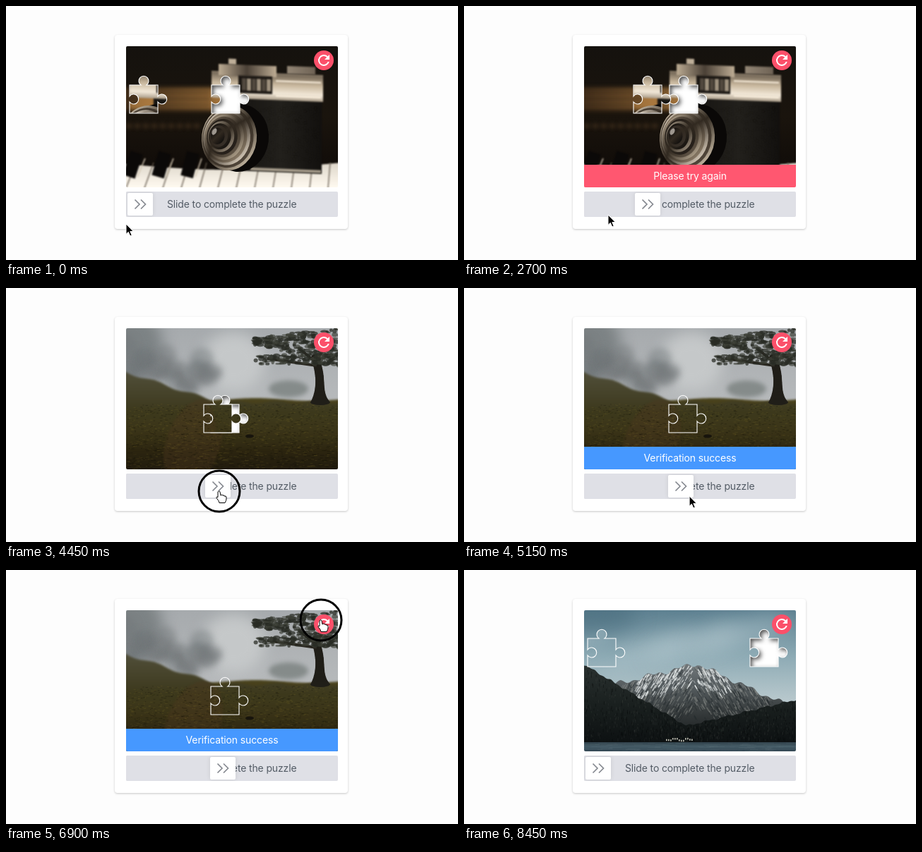
An HTML page with a canvas for the animation above (8500 ms loop, 640 by 360 pixels).

```html
<!DOCTYPE html>
<html lang="en">
<head>
<meta charset="utf-8">
<title>Slide puzzle</title>
<style>
html, body { margin: 0; width: 100%; height: 100%; overflow: hidden; background: #fdfdfd; }
#stage { position: absolute; left: 0; top: 0; width: 640px; height: 360px; overflow: hidden; font: 14px/32px Inter, "Liberation Sans", sans-serif; letter-spacing: -.14px; }
#stage > *, #track > * { position: absolute; box-sizing: border-box; }
#card { left: 154px; top: 41px; width: 330px; height: 275px; border-radius: 4px; background: #fff; box-shadow: 0 1px 3px rgba(0, 0, 0, .22); }
#photo { left: 170px; top: 57px; width: 300px; height: 200px; border-radius: 2px; overflow: hidden; }
#photo canvas { display: block; }
#bar { position: absolute; left: 0; top: 168px; width: 300px; height: 32px; color: #fff; text-align: center; }
#track { left: 170px; top: 263px; width: 300px; height: 36px; border-radius: 2px; background: #dfe0e6; overflow: hidden; }
#hint { left: 58px; top: 2px; color: #535b65; white-space: nowrap; }
#cover { left: 0; top: 0; height: 36px; background: #dfe0e6; }
#handle { left: 2px; top: 2px; width: 36px; height: 32px; border-radius: 2px; background: #fff; box-shadow: 0 0 6px rgba(0, 0, 0, .1); }
#over { left: 0; top: 0; }
</style>
</head>
<body>
<div id="stage">
  <div id="card"></div>
  <div id="photo"><canvas id="view" width="300" height="200"></canvas><div id="bar"></div></div>
  <div id="track">
    <div id="hint">Slide to complete the puzzle</div>
    <div id="cover"></div>
    <div id="handle"><svg width="36" height="32"><path d="M10.5 9.5l6.5 6.5-6.5 6.5M19 9.5l6.5 6.5-6.5 6.5" fill="none" stroke="#858990" stroke-width="1.7"/></svg></div>
  </div>
  <svg id="over" width="640" height="360">
    <circle cx="450" cy="77" r="14" fill="#fb506a"/>
    <path transform="translate(438 65)" fill="#fff" d="M17.65 6.35A8 8 0 1 0 19.73 14h-2.08A6 6 0 1 1 16.22 7.78L13 11h7V4z"/>
    <g id="cursor">
      <circle id="ring" r="29" fill="none" stroke="#000" stroke-width="3"/>
      <path id="arrow" d="M0 0V14.4L3.3 11.3 5.8 17 8.2 16 5.8 10.5H10.3Z" stroke="#fff"/>
      <path id="hand" d="M-2 1Q0-2 1 1L2 6Q4 4 5 6 7 5 7 7 10 6 10 9V11Q10 13 8 16.5H0Q0 14-4 9.6-4 7-2 8.5Z" fill="#fff" stroke="#000"/>
    </g>
  </svg>
</div>
<script>
const $ = id => document.getElementById(id);
const LOOP = 8500, W = 300, H = 200, LEFT = 170, TOP = 57;
const RETRY = 3000, SOLVED = 4850, NEXT = 7300;
const view = $('view').getContext('2d');
const piecePath = new Path2D('M0 0H16A7 7 0 1 1 24 0H40V16A7 7 0 1 1 40 24V40H0V24A7 7 0 1 0 0 16Z');

// Painting helpers, in stage coordinates
let c, seed;
const rnd = (a, b) => {
  seed = (seed * 16807) % 2147483647;
  return a + (b - a) * seed / 2147483647;
};
const repeat = (n, fn) => { for (let i = 0; i < n; i++) fn(i); };
const mix = (a, b, u) => a + (b - a) * u;
const soft = px => { c.filter = px ? `blur(${px}px)` : 'none'; };
const box = (fill, x, y, w, h) => { c.fillStyle = fill; c.fillRect(x, y, w, h); };
const oval = (fill, x, y, rx, ry = rx, turn = 0) => {
  c.fillStyle = fill;
  c.beginPath();
  c.ellipse(x, y, rx, ry, turn, 0, 7);
  c.fill();
};
const line = (stroke, width, x0, y0, x1, y1) => {
  c.strokeStyle = stroke;
  c.lineWidth = width;
  c.beginPath();
  c.moveTo(x0, y0);
  c.lineTo(x1, y1);
  c.stroke();
};
const ramp = (x0, y0, x1, y1, ...cols) => {
  const g = c.createLinearGradient(x0, y0, x1, y1);
  cols.forEach((col, i) => g.addColorStop(i / (cols.length - 1), col));
  return g;
};
const down = (...cols) => ramp(0, TOP, 0, TOP + H, ...cols);
const across = (...cols) => ramp(LEFT, 0, LEFT + W, 0, ...cols);
// Fills everything below the curve y = edge(x)
const below = (edge, fill) => {
  c.fillStyle = fill;
  c.beginPath();
  for (let x = 160; x <= 480; x += 2) c.lineTo(x, edge(x));
  c.lineTo(480, 265);
  c.lineTo(160, 265);
  c.fill();
};

function camera() {
  box(down('#15120e', '#1a140d', '#0d0907'), LEFT, TOP, W, H);
  soft(3);
  box(across('#49331d', '#aa793f', '#1a140d'), 160, 116, 170, 32);
  repeat(4, i => box('#20160daa', 160, 121 + i * 9, 130, 3));
  repeat(9, i => oval('#5a4027', 174 + i * 12, 170, 4, 2));
  soft(.8);
  // Keyboard
  below(x => 224 + 8 * Math.sin((x - 170) / 90), down('#756a5c', '#9f9382', '#fffaf0'));
  repeat(13, i => line('#62584c', 1.3, 184 + i * 25, 222, 170 + i * 26, 258));
  repeat(3, i => {
    line('#0b0908', 18, 185 + i * 40, 208, 174 + i * 41, 242);
    line('#d5c8b4', 1.5, 197 + i * 40, 216, 186 + i * 41, 242);
  });
  // Body and top plate
  c.save();
  c.transform(1, .04, 0, 1, 0, -12);
  box(ramp(330, 0, 448, 0, '#171512', '#22201c', '#12100e'), 325, 124, 122, 108);
  box('#aaa08f', 346, 227, 100, 4);
  box(ramp(0, 82, 0, 134, '#d5c6ae', '#786b5a', '#c7b69c', '#f2e8d8', '#8c7d69'), 291, 92, 158, 38);
  box(ramp(300, 0, 382, 0, '#bfae95', '#4a4036', '#bbaa92'), 301, 82, 82, 16);
  box('#1c1814', 329, 97, 48, 25);
  repeat(6, i => box(i % 2 ? '#9d907d' : '#51483e', 334 + i * 7, 101, 6, 17));
  repeat(2, i => box('#fff4e2', 382, 102 + i * 21, 64, 2));
  box(across('#2b241d', '#dacbb5', '#51463a'), 398, 81, 40, 11);
  box('#bdae98', 315, 74, 11, 8);
  c.restore();
  repeat(400, () => box('#3b363044', rnd(352, 443), rnd(140, 222), 1, 1));
  // Lens, rings narrowing towards the glass
  soft(.6);
  oval('#0a0807', 330, 187, 42, 48, .12);
  const metal = ['#e8d9c1', '#5b4f42', '#fff2df', '#a3927b', '#cbbba3', '#6d6051', '#201b17', '#aa9d8b', '#100e0c', '#39322c', '#090808'];
  metal.forEach((col, i) => {
    const u = i / metal.length;
    const x = mix(316, 298, u), y = mix(187, 184, u), r = mix(39, 7, u);
    oval(ramp(x - r, y - r, x + r, y + r, col, '#312920', col), x, y, r, r * 1.18, .12);
  });
  oval('#9e978f', 295, 178, 3, 5, .5);
}

function forest() {
  box(down('#a6aaad', '#b6b9bb', '#777a70'), LEFT, TOP, W, H);
  soft(10);
  oval('#c5c8c9', 322, 105, 45, 42);
  oval('#7c8284', 176, 80, 46, 48);
  soft(5);
  repeat(30, i => oval('#71777970', 170 + i * 4.3, rnd(75 + i, 146), rnd(8, 17), rnd(8, 16)));
  soft(3);
  oval('#858b8a', 400, 143, 28, 12);
  soft(1.5);
  below(x => 158 - 2 * Math.sin(x / 25), down('#4f4a2a', '#4f4a2a', '#4a431d', '#352d12', '#211b0d'));
  below(x => 162 - Math.max(0, 300 - x) * .33 + 2 * Math.sin(x / 9), ramp(0, 120, 0, 230, '#504e39', '#3c381c', '#3c381c00'));
  oval('#4d391f66', 265, 220, 38, 65, .35);
  soft(.5);
  repeat(1700, i => {
    const y = rnd(164, 257);
    box(i % 2 ? '#80723034' : '#110f0848', rnd(170, 470), y, rnd(1, 3 + (y - 160) / 25), 1);
  });
  oval('#17140c', 345, 210, 6, 2.5);
  // Near tree
  repeat(34, i => {
    const u = i / 33;
    oval('#201e18', 438 + 10 * u * u + 4 * Math.sin(u * 4), 98 + 64 * u, 6 + 8 * u ** 6, 4);
  });
  repeat(3, i => line('#292720', 4, 440, 110 - i * 4, 370 + i * 45, 100 - i * 14));
  soft(.7);
  repeat(360, i => {
    const u = rnd(0, 1), x = mix(352, 474, u);
    const y = i % 4 ? rnd(70 - 14 * u, 80 + 32 * u) : rnd(95, 108);
    oval(i % 3 ? '#292b25bb' : '#3c3f36aa', x, y, rnd(2, 6), rnd(1, 3.5));
  });
}

function mountain() {
  const jag = x => 1.8 * Math.sin(x / 3) + 2.5 * Math.sin(x / 7.3);
  const ridge = x => 133 + Math.abs(x - 330) * (x < 330 ? .25 : .46) + jag(x);
  const woods = x => 221 - (x < 315 ? (315 - x) * .6 : (x - 315) * .24) + jag(x * 1.7) * .4;
  box(down('#5e8191', '#8eabb5', '#bccbcf', '#bccbcf'), LEFT, TOP, W, H);
  soft(14);
  oval('#4a6d7e99', 180, 62, 65, 28);
  repeat(3, i => oval('#b9ccd277', 260 + i * 65, 115 - i * 12, 70, 16, -.3));
  soft(.5);
  below(ridge, ramp(0, 130, 0, 230, '#747a7d', '#565d60', '#3a3f40', '#202425'));
  // Rock and snow streaks run down both flanks
  repeat(1000, i => {
    const x = rnd(225, 435), d = rnd(0, 1) ** 1.5 * 70, s = rnd(3, 10);
    const snow = d < 27 && x > 245 && x < 375 && i % 3;
    const y = ridge(x) + d;
    line(snow ? '#e6eaebb0' : i % 2 ? '#22292b70' : '#9a9c9860', rnd(.6, 2), x, y, x + (x < 325 ? -.6 : .6) * s, y + s);
  });
  below(woods, ramp(0, 135, 0, 244, '#29302f', '#1a201f', '#0d1112'));
  repeat(900, i => {
    const x = rnd(170, 470);
    box(i % 2 ? '#06090a60' : '#48504b38', x, rnd(woods(x), 240), 1, rnd(2, 5));
  });
  box(ramp(0, 243, 0, 257, '#2c3c45', '#455b66', '#344854'), LEFT, 244, W, 14);
  repeat(90, () => box('#82949a28', rnd(165, 465), rnd(245, 257), rnd(5, 25), .7));
  repeat(13, i => box('#b9b9ae', 286 + i * 3, rnd(237, 241), 1.7, 2.5));
}

const scenes = [[camera, 291, 112], [forest, 290, 165], [mountain, 405, 97]].map(([paint, x, y]) => {
  const img = document.createElement('canvas');
  img.width = W;
  img.height = H;
  c = img.getContext('2d');
  c.translate(-LEFT, -TOP);
  seed = 4711;
  paint();
  return { img, x: x - LEFT, y: y - TOP };
});

// Runs fill() clipped to the piece at x, y and then strokes its outline
function cut(x, y, fill) {
  view.save();
  view.translate(x, y);
  view.save();
  view.clip(piecePath);
  fill();
  view.restore();
  view.strokeStyle = '#fff';
  view.lineWidth = 1.1;
  view.stroke(piecePath);
  view.restore();
}

function innerShadow() {
  view.fillStyle = '#fff';
  view.fill(piecePath);
  const around = new Path2D('M-40-40H90V90H-40Z');
  around.addPath(piecePath);
  view.shadowColor = 'rgba(0,0,0,.7)';
  view.shadowBlur = 6;
  view.shadowOffsetX = view.shadowOffsetY = 3;
  view.fill(around, 'evenodd');
}

// Cursor stops: time, x, y
const path = [
  [0, 170, 309], [650, 187, 288], [800, 187, 288], [1150, 249, 278], [2300, 204, 296], [2950, 204, 296],
  [3700, 195, 288], [3800, 195, 288], [4450, 302, 288], [5000, 309, 290], [5800, 417, 342],
  [6000, 419, 330], [6700, 446, 71], [7150, 446, 71], [7450, 522, 35], [LOOP, 522, 35]
];
const press = [[700, 1200], [3700, SOLVED], [6850, 7100]];
const bars = [
  [1300, RETRY, '#ff5770', 'Please try again'],
  [4900, NEXT, '#4698ff', 'Verification success']
];

const ease = (t, from, to) => {
  const u = Math.min(1, Math.max(0, (t - from) / (to - from)));
  return u * u * (3 - 2 * u);
};
const during = t => ([from, to]) => t >= from && t < to;

function cursorAt(t) {
  const i = path.findIndex(p => p[0] > t);
  const [from, x, y] = path[i - 1], [to, nx, ny] = path[i];
  const u = ease(t, from, to);
  return [mix(x, nx, u), mix(y, ny, u)];
}

function handleAt(t) {
  if (t < RETRY) return 70 * ease(t, 800, 1150);
  return t < NEXT ? 110 * ease(t, 3800, 4450) + 7 * ease(t, 4450, 4700) : 0;
}

function draw(t) {
  const scene = scenes[t < RETRY ? 0 : t < NEXT ? 1 : 2];
  const offset = handleAt(t);
  const solved = t >= SOLVED && t < NEXT;
  const pieceX = solved ? scene.x : 5 + Math.max(0, offset - 5);
  view.drawImage(scene.img, 0, 0);
  if (!solved) cut(scene.x, scene.y, innerShadow);
  cut(pieceX, scene.y, () => view.drawImage(scene.img, -scene.x, -scene.y));

  $('handle').style.transform = `translateX(${offset}px)`;
  $('cover').style.width = offset + 20 + 'px';

  const bar = bars.find(during(t));
  $('bar').style.visibility = bar ? 'visible' : 'hidden';
  if (bar) {
    const [start, , color, text] = bar;
    $('bar').style.background = color;
    $('bar').textContent = text;
    $('bar').style.transform = `translateY(${32 * (1 - ease(t, start, start + 250))}px)`;
  }

  const [x, y] = cursorAt(t);
  const pressed = press.some(during(t));
  $('cursor').setAttribute('transform', `translate(${x} ${y})`);
  $('cursor').style.display = t < 7500 ? '' : 'none';
  $('ring').style.display = $('hand').style.display = pressed ? '' : 'none';
  $('arrow').style.display = pressed ? 'none' : '';
}

function tick() {
  draw(performance.now() % LOOP);
  requestAnimationFrame(tick);
}
tick();
</script>
</body>
</html>
```
